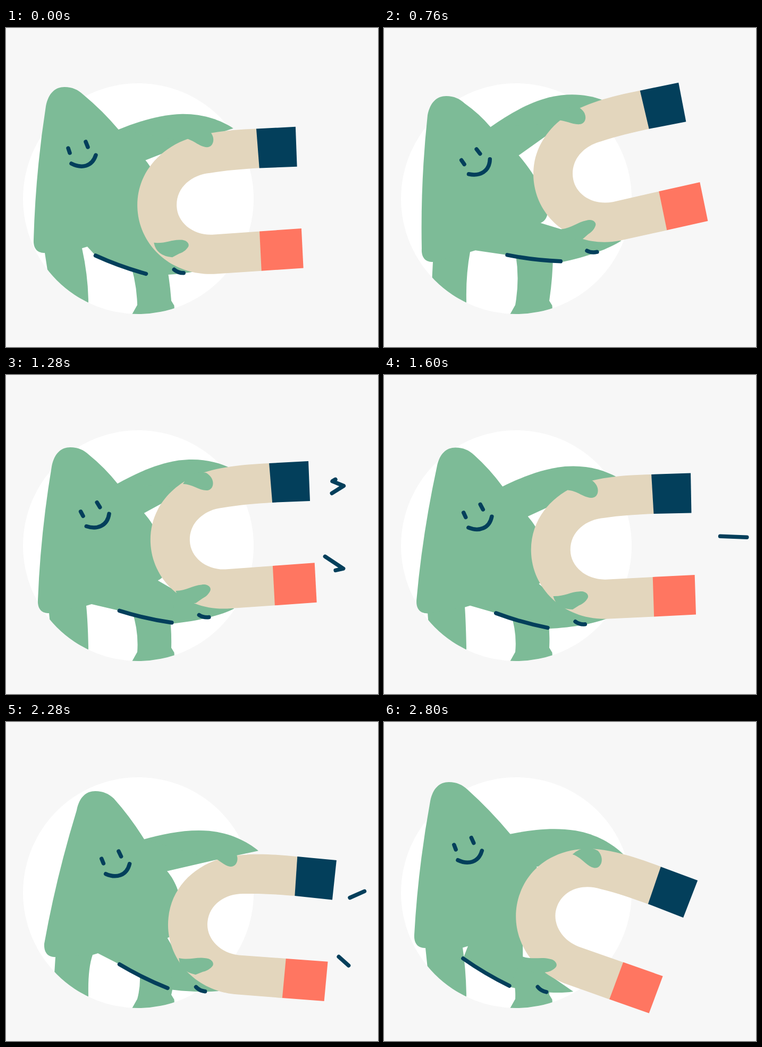
An HTML page for the animation above (2.84 s loop, 700 by 600 pixels).

```html
<!DOCTYPE html>
<html lang="en">
<head>
<meta charset="utf-8">
<title>Magnet</title>
<style>
  html, body { margin: 0; width: 100%; height: 100%; overflow: hidden; background: #f7f7f7; }
  svg { display: block; width: 100vw; height: 100vh; }
  .skin { fill: #7dbb97; }
  .ink { fill: none; stroke: #033f5b; stroke-width: 7.5; stroke-linecap: round; stroke-linejoin: round; }
</style>
</head>
<body>
<svg viewBox="0 0 700 600">
  <defs><clipPath id="disc"><circle cx="249" cy="321" r="217"/></clipPath></defs>
  <circle cx="249" cy="321" r="217" fill="#fff"/>
  <g class="skin" clip-path="url(#disc)">
    <path id="legL"/>
    <path id="legR"/>
  </g>
  <path id="body" class="skin"/>
  <path class="skin upper" d="M0 0C36-14 76-27 120-28C160-28 192-16 216 0L135 26Z"/>
  <path class="skin lower" d="M101 2C150-14 190-35 210-52L95-60Z"/>
  <g class="magnet">
    <g transform="translate(-514.5 -305.5)">
      <path fill="#e3d6bd" d="M516 209C455 209 405 214 370 229C318 252 286 296 286 349C286 420 345 479 425 479L516 476.5L515 402L425 405C389 405 360 380 360 349C360 314 390 291 425 289C455 285 485 284 519 283Z"/>
      <path fill="#033f5b" d="M515 209L589 208L589 283L518 283Z"/>
      <path fill="#ff7661" d="M514 402L593 399.5L594 474L515 476.5Z"/>
    </g>
    <g id="bolts" class="ink"></g>
  </g>
  <path class="skin upper" d="M122 17C139 19 151 34 166 35C180 35 184 14 168 2Q141-7 122 17Z"/>
  <g class="lower">
    <path class="skin" d="M95-60C115-65 124-77 140-82C152-87 161-80 158-73C156-66 152-61 147-57L137-46Q108-38 95-60Z"/>
    <path class="ink" d="M0 0Q50 4 101 0M148-25.5Q157-22 167-25.5"/>
  </g>
  <path class="ink face" d="M-29-21L-26-12M4-33L8-23M-23 8C-4 18 16 14 23-8"/>
</svg>
<script>
const LOOP = 2840, STEP = 40;

// time, magnet x, y and angle, crown x and y, lean, gaze
const poses = [
  [0, 474, 286, -2.1, 110, 111, 37, 0],
  [320, 508, 311.5, 12, 111, 114, 24, -11.5],
  [760, 499.5, 212.5, -10.9, 117, 128, 25, -16],
  [1280, 498.5, 262.5, -2.3, 121, 136, 40, -9.5],
  [1920, 514.5, 305.5, 0, 151, 135, 65, -3.7],
  [2280, 537.5, 349, 6.1, 168, 130, 75, -3.7],
  [2560, 517, 386, 23, 147, 121, 58, -3],
  [2800, 485.5, 362, 21.2, 122, 113, 44, -2.2]
];

// Smooth cubic through the poses, clamped at both ends.
function poseAt(t) {
  const n = poses.length - 1;
  let i = 0;
  while (i < n - 1 && poses[i + 1][0] < t) i++;
  const a = poses[i], b = poses[i + 1], h = b[0] - a[0];
  const slope = (j, k) => {
    const p = poses[Math.max(0, j - 1)], q = poses[Math.min(n, j + 1)];
    return h * (q[k] - p[k]) / (q[0] - p[0]);
  };
  const u = Math.min(1, (t - a[0]) / h), v = 1 - u;
  return a.map((from, k) => from + (b[k] - from) * u * u * (3 - 2 * u)
    + slope(i, k) * u * v * v - slope(i + 1, k) * u * u * v);
}

const add = (p, x, y) => [p[0] + x, p[1] + y];
const mid = (p, q) => [(p[0] + q[0]) / 2, (p[1] + q[1]) / 2];
const path = (s, ...v) => String.raw(s, ...v.map(p => p.map(n => n.toFixed(2))));
const shape = (id, d) => document.getElementById(id).setAttribute("d", d);

// Moves a rigid group; returns a function from its points to the stage.
function place(name, [x, y], deg) {
  for (const el of document.querySelectorAll("." + name))
    el.setAttribute("transform", `translate(${x} ${y}) rotate(${deg})`);
  const r = deg * Math.PI / 180, c = Math.cos(r), s = Math.sin(r);
  return (px, py) => [x + px * c - py * s, y + px * s + py * c];
}

// Zigzags shooting out from the poles, with the start time of each burst.
const TRAIL = 56, SPEED = .4;
const bolts = [
  ["M107-30L139-48.5L118-58L151-76", [190, 1113, 2205]],
  ["M97 33L139 38L124 22L178 25", [313, 1290, 2345]],
  ["M98 82.5L132 107L110 111L144 135", [218, 1138, 2218]]
].map(([d, starts]) => {
  const el = document.createElementNS("http://www.w3.org/2000/svg", "path");
  el.setAttribute("d", d);
  document.getElementById("bolts").append(el);
  return { el, starts, len: el.getTotalLength() };
});

function drawBolts(t) {
  for (const { el, starts, len } of bolts) {
    const head = (t - Math.max(...starts.filter(s => s <= t))) * SPEED;
    const from = Math.max(0, head - TRAIL), to = Math.min(len, head);
    const on = to > from && from < len;
    el.style.display = on ? "" : "none";
    if (!on) continue;
    el.setAttribute("stroke-dasharray", `${to - from} 999`);
    el.setAttribute("stroke-dashoffset", -from);
  }
}

function draw(t) {
  const [, mx, my, tilt, cx, cy, lean, gaze] = poseAt(t);
  const crown = [cx, cy], seat = [cx - lean, cy + 312];

  // How far the magnet hangs below the head swings both arms.
  const hang = my - cy, swing = .145 * hang - 5.5;
  const neck = 24 + .24 * hang;
  const temple = add(crown, -35, 36), nape = add(crown, 35, 14);
  const shoulder = add(nape, neck * (1.27 - .007 * lean), neck);
  const armpit = add(shoulder, 58 - .2 * lean, 49 + .05 * hang);
  const elbow = add(crown, 202 - .2 * hang - .3 * lean, 215 + .28 * hang);
  const thigh = add(seat, 70, .11 * hang - 28);
  const corner = add(seat, -21, -25);

  place("magnet", [mx, my], tilt);
  place("face", add(crown, 36 - 1.65 * gaze, 126 + .27 * lean), gaze);
  const upper = place("upper", shoulder, swing - 20.5);
  const lower = place("lower", [mx - 232 - .42 * hang, my + 282 - .8 * hang], swing);
  const fold = lower(0, 0);

  shape("body",
    path`M${temple}C${add(temple, 5, -25)} ${add(crown, -17, 0)} ${crown}` +
    path`C${add(crown, 15, 0)} ${add(nape, -10, -9)} ${nape}` +
    path`Q${add(mid(nape, shoulder), 3, -3)} ${shoulder}` +
    path`L${upper(60, -5)}L${upper(135, 26)}L${armpit}` +
    path`C${add(armpit, 35, 40)} ${add(elbow, 35, -15)} ${elbow}` +
    path`L${lower(95, -60)}L${lower(140, -40)}L${lower(101, 2)}Q${lower(50, 4)} ${fold}` +
    path`L${add(thigh, 10, -3)}L${thigh}L${seat}` +
    path`C${add(seat, -13, 0)} ${add(corner, -1, 18)} ${corner}` +
    path`Q${add(mid(temple, corner), -8, 0)} ${temple}Z`);

  shape("legL",
    path`M${add(seat, 0, -12)}L${seat}L${[88, 520]}L${[155, 550]}L${[155, 512]}` +
    path`Q${[154, 464]} ${thigh}L${add(thigh, 0, -6)}Z`);

  const hip = [seat[0] + 156, fold[1]], hipR = add(hip, 70, 0);
  const footL = [247, 521], footR = [311, 513];
  shape("legR",
    path`M${hip}Q${add(mid(hip, footL), 8, 0)} ${footL}L${[238, 537]}L${[232, 547]}` +
    path`L${[318, 547]}L${[316.5, 522]}L${footR}Q${add(mid(hipR, footR), 3, 0)} ${hipR}Z`);

  drawBolts(t);
}

const t0 = performance.now();
function tick() {
  const t = (performance.now() - t0 + .5) % LOOP;
  draw(Math.floor(t / STEP) * STEP);
  requestAnimationFrame(tick);
}
tick();
</script>
</body>
</html>
```
